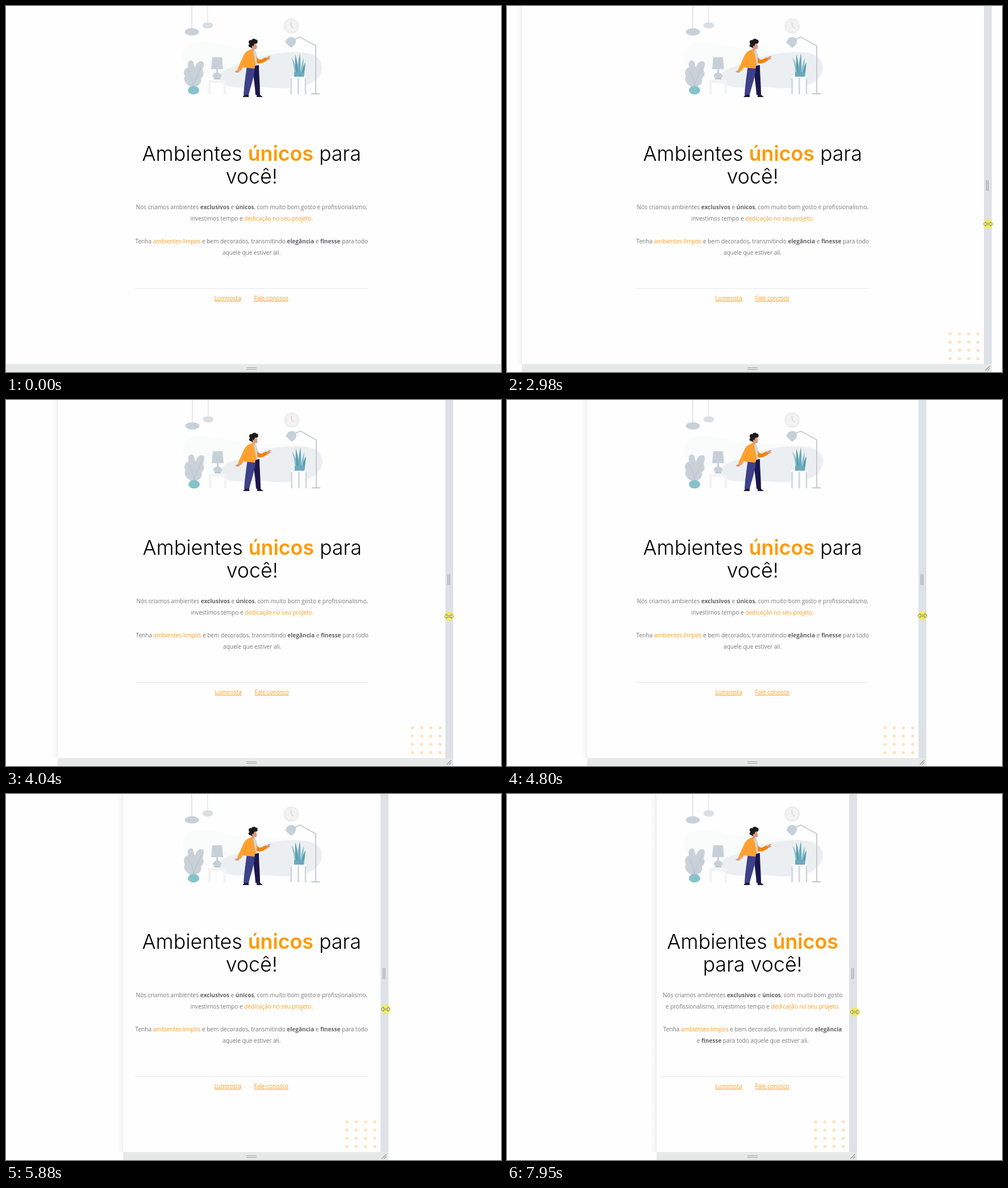
An HTML page with a canvas that plays this animation: 871 by 643 pixels, repeating every 7990 ms.

```html
<!DOCTYPE html>
<html lang="pt-BR">
<head>
<meta charset="utf-8">
<title>Ambientes únicos</title>
<style>
  html, body { margin: 0; width: 100%; height: 100%; overflow: hidden; background: #fefefe; }
  #stage { position: relative; width: 871px; height: 643px; overflow: hidden; }
  canvas { position: absolute; left: 0; top: 0; }
  #page { position: absolute; top: 0; text-align: center; color: #777; font: 10.07px/20px "Open Sans", sans-serif; }
  h1, p { position: absolute; left: 0; width: 100%; margin: 0; }
  h1 { top: 239px; color: #000; font: 300 35.7px/40px Inter, sans-serif; }
  b { font-weight: 700; color: #66666b; }
  em { font-style: normal; color: #ff9a1a; }
  h1 em { font-weight: 600; color: #f90; }
  #first { top: 343px; }
  #second { top: 403px; }
  #links { position: absolute; left: 0; top: 0; }
  #links span { position: absolute; top: 503px; white-space: nowrap; text-decoration: underline; color: #ff9a1a;
    font: 10.07px/20px "Open Sans", sans-serif; }
</style>
</head>
<body>
<div id="stage">
  <canvas id="scene" width="871" height="643"></canvas>
  <div id="page">
    <h1>Ambientes <em>únicos</em> para você!</h1>
    <p id="first">Nós criamos ambientes <b>exclusivos</b> e <b>únicos</b>, com muito bom gosto e profissionalismo, investimos tempo e <em>dedicação no seu projeto.</em></p>
    <p id="second">Tenha <em>ambientes limpos</em> e bem decorados, transmitindo <b>elegância</b> e <b>finesse</b> para todo aquele que estiver ali.</p>
  </div>
  <div id="links"><span style="left:366.5px">Lumirosta</span><span style="left:436.5px">Fale conosco</span></div>
  <canvas id="overlay" width="871" height="643"></canvas>
</div>
<script>
const LOOP = 7990, WIDTH = 871, HEIGHT = 643, AXIS = 432.2, BAR = 14, FLOOR = 629;
const scene = document.getElementById('scene').getContext('2d');
const overlay = document.getElementById('overlay').getContext('2d');
const page = document.getElementById('page');
const links = document.getElementById('links');

// time, right page edge, cursor offset from it, cursor height
const drag = [
  [1700, 935, 7, 385], [2520, 873, 7, 384], [2980, 839, 7.5, 383], [3340, 815, 7, 382],
  [4040, 773.5, 6.5, 380], [4160, 767, 7, 379.5], [4800, 724, 7, 379], [4980, 716, 7.5, 379],
  [5790, 666, 9, 378], [5880, 659, 9, 378], [6600, 641, 10, 377.5], [6800, 633, 10, 377.5],
  [7390, 623, 10, 380], [7950, 602, 10, 383]
];

function poseAt(time) {
  const next = drag.findIndex(key => key[0] > time);
  if (next === 0) return drag[0];
  if (next < 0) return drag[drag.length - 1];
  const a = drag[next - 1], b = drag[next];
  const k = (time - a[0]) / (b[0] - a[0]);
  return a.map((value, i) => value + (b[i] - value) * k);
}

function rect(ctx, color, x, y, w, h) {
  ctx.fillStyle = color;
  ctx.fillRect(x, y, w, h);
}

function oval(ctx, color, x, y, rx, ry = rx) {
  ctx.fillStyle = color;
  ctx.beginPath();
  ctx.ellipse(x, y, rx, ry, 0, 0, Math.PI * 2);
  ctx.fill();
}

function shape(color, path) {
  scene.fillStyle = color;
  scene.fill(new Path2D(path));
}

function stroke(ctx, color, width, path) {
  ctx.strokeStyle = color;
  ctx.lineWidth = width;
  ctx.stroke(new Path2D(path));
}

function drawRoom() {
  shape('#fafbfb', 'M311 88C310 70 325 62 348 63C380 65 410 78 450 78C485 78 515 76 535 88L500 125L330 118C318 112 312 102 311 88Z');
  shape('#eceff1', 'M375 126C380 108 402 108 424 98C448 87 476 82 506 81C536 80 555 88 556 107C556 128 535 142 505 144C470 146 452 140 425 143C400 145 374 140 375 126Z');

  rect(scene, '#dce0e4', 326, 0, 1.6, 40);
  rect(scene, '#e3e7e9', 354, 0, 1.6, 30);
  oval(scene, '#c8d1d9', 327, 45.5, 12.5, 6.5);
  oval(scene, '#d9dfe3', 355, 34, 9.5, 5.5);

  oval(scene, '#ebebeb', 501.8, 35.2, 13.4);
  oval(scene, '#f3f3f3', 501.8, 35.2, 11.2);
  for (let i = 0; i < 4; i++) {
    const angle = i * Math.PI / 2;
    oval(scene, '#d5d5d5', 501.8 + 9.5 * Math.cos(angle), 35.2 + 9.5 * Math.sin(angle), .7);
  }
  stroke(scene, '#bcc1c5', 1, 'M501 28L502 35.5L505.5 39');

  stroke(scene, '#c5ccd2', 2, 'M507 59L517 54.5L545 70V154');
  rect(scene, '#bfc6cc', 537, 153.3, 15, 2);
  shape('#c5d0d9', 'M491.5 64C493 58 497 54 503 54.5C508 55 511 59 510 64C508 69 505 72 501.5 73.5Z');
}

function drawFurniture() {
  shape('#c9d1d9', 'M325 142C315 138 311 128 315 123C310 116 316 108 321 108C317 100 323 94 327 96C332 98 329 105 333 108C335 98 342 95 347 98C350 104 345 110 346 114C350 119 346 125 343 127C345 135 340 140 333 142Z');
  stroke(scene, '#b1bcc6', .8, 'M330 142C328 128 326 120 319 113M330 140C332 128 339 121 343 108');
  oval(scene, '#87c2cb', 330, 148, 10, 7.4);

  rect(scene, '#f3f3f3', 356, 130, 31, 5);
  rect(scene, '#f3f3f3', 356, 130, 4.5, 25);
  rect(scene, '#f3f3f3', 382.5, 130, 4.5, 25);
  shape('#c7d0d8', 'M363 90H380L382 111H361Z');
  shape('#c7d0d8', 'M370 111H373V117C377 118 380 121 379 124L376 127V129H367V127L364 124C363 121 366 118 370 117Z');
  rect(scene, '#b7c2cb', 366, 127, 11, 2);

  rect(scene, '#fbfcfc', 500, 124, 28.5, 31);
  for (const x of [500.3, 513, 525.7]) rect(scene, '#cfd6dc', x, 126.5, 2.6, 28.5);
  shape('#8bc3cd', 'M508 124C508 111 505 99 502 90C509 99 511 111 513 124ZM517 124C518 110 521 99 524 91C524 104 522 114 521 124Z');
  shape('#5d9db1', 'M511 124C508 107 509 95 509 85C513 97 514 111 515 124ZM519 124C521 111 524 103 527 99C526 109 525 117 524 124Z');
  shape('#6ca9bc', 'M514 124C512 106 515 94 517 83C519 97 518 111 518 124Z');
  rect(scene, '#6ca9bc', 507, 116, 17, 8.2);
}

function drawMan() {
  shape('#1a174d', 'M433 105L445 104C445 118 447 139 447 156H439C438 141 436 126 434 114Z');
  shape('#3c4189', 'M424 104L438 105C438 122 431 139 427 156H418C419 138 422 120 424 104Z');
  shape('#241a31', 'M419 156H427V160H417C416 158 419 158 419 156ZM441 156H447L452 160H441Z');
  shape('#d79b83', 'M409 111L412 113L409 117L405 117L402 115L406 113ZM457 92L462 88L466 88L463 91L466 92L460 95Z');
  shape('#cdd7dd', 'M433 77L439 79C443 87 443 97 443 104L435 105Z');
  shape('#ef8410', 'M440 84C441 92 445 95 449 94L457 90L460 95C452 101 444 103 441 99Z');
  shape('#ffa12f', 'M433 76C425 77 420 82 417 89L407 111L413 114L419 104L417 108L437 110C440 102 441 91 439 80Z');
  stroke(scene, '#f08a18', .8, 'M423 92L419 104');
  shape('#cdd7dd', 'M434 77L438 78C442 87 442 97 440 105C438 97 437 86 434 77Z');
  shape('#d79b83', 'M433 67L440 64L441.5 73C441 77 438 77 437 75V79L432 77Z');
  shape('#1c191b', 'M429 72C425 71 427 67 428.5 67C425 63 428 59 432 60C434 57 438 57 439 59C443 58 444 64 441 66L437 66L435 71L433 69V74Z');
}

function drawFrame(left, right) {
  rect(overlay, '#e7e9e9', left, FLOOR, right + BAR - left, HEIGHT - FLOOR);
  rect(overlay, '#dee2e6', right, 0, BAR, FLOOR);
  for (const y of [635, 638]) rect(overlay, '#9d9f9f', 423, y, 18, 1);
  for (const x of [4, 7]) rect(overlay, '#999ca0', right + x, 306, 1.2, 19);
  overlay.save();
  overlay.translate(right, 0);
  stroke(overlay, '#8f9292', 1.1, 'M2.5 640.5L10.5 632.5M6.5 640.5L10.5 636.5');
  overlay.restore();
}

function drawCursor(x, y) {
  oval(overlay, 'rgba(244,234,84,.88)', x, y, 8.3);
  overlay.save();
  overlay.translate(x, y);
  overlay.fillStyle = '#f6f0a5';
  const arrows = 'M-8 0L-4 -4V-1.2H4V-4L8 0L4 4V1.2H-4V4Z';
  overlay.fill(new Path2D(arrows));
  stroke(overlay, '#6d692f', .8, arrows);
  overlay.restore();
}

function draw(time) {
  const [, rawEdge, offset, cursorY] = poseAt(time);
  // The page width moves in whole pixels, so its centred edge lands on halves.
  const edge = Math.round(rawEdge * 2) / 2;
  const right = Math.floor(edge), left = Math.ceil(864.5 - edge);
  const shift = edge > right ? 1 : 0;

  rect(scene, '#fefefe', 0, 0, WIDTH, HEIGHT);
  if (left > 0) {
    const shade = scene.createLinearGradient(left - 10, 0, left, 0);
    shade.addColorStop(0, 'rgba(0,0,0,0)');
    shade.addColorStop(1, 'rgba(0,0,0,.045)');
    rect(scene, shade, left - 10, 0, 10, FLOOR);
    rect(scene, '#e9eaeb', left - 1, 0, 1, FLOOR);
  }

  const room = Math.min(409.5, (right - left) * .955);
  rect(scene, '#e3e8ec', AXIS - room / 2 + shift, 495.7, room, 1.2);
  scene.save();
  scene.translate(shift, 0);
  drawRoom();
  drawFurniture();
  drawMan();
  scene.restore();
  for (let i = 0; i < 16; i++) {
    oval(scene, '#ffe2bd', right - 59 + shift + (i % 4) * 16.3, 576 + Math.floor(i / 4) * 14.5, 2.8);
  }

  const measure = Math.min(412, (right - left) * .948);
  page.style.width = measure + 'px';
  page.style.left = AXIS - measure / 2 + shift + 'px';
  links.style.left = shift + 'px';

  overlay.clearRect(0, 0, WIDTH, HEIGHT);
  drawFrame(left, right);
  drawCursor(right + offset, cursorY);
}

const start = performance.now();
function tick() {
  draw((performance.now() - start) % LOOP);
  requestAnimationFrame(tick);
}
tick();
</script>
</body>
</html>
```
